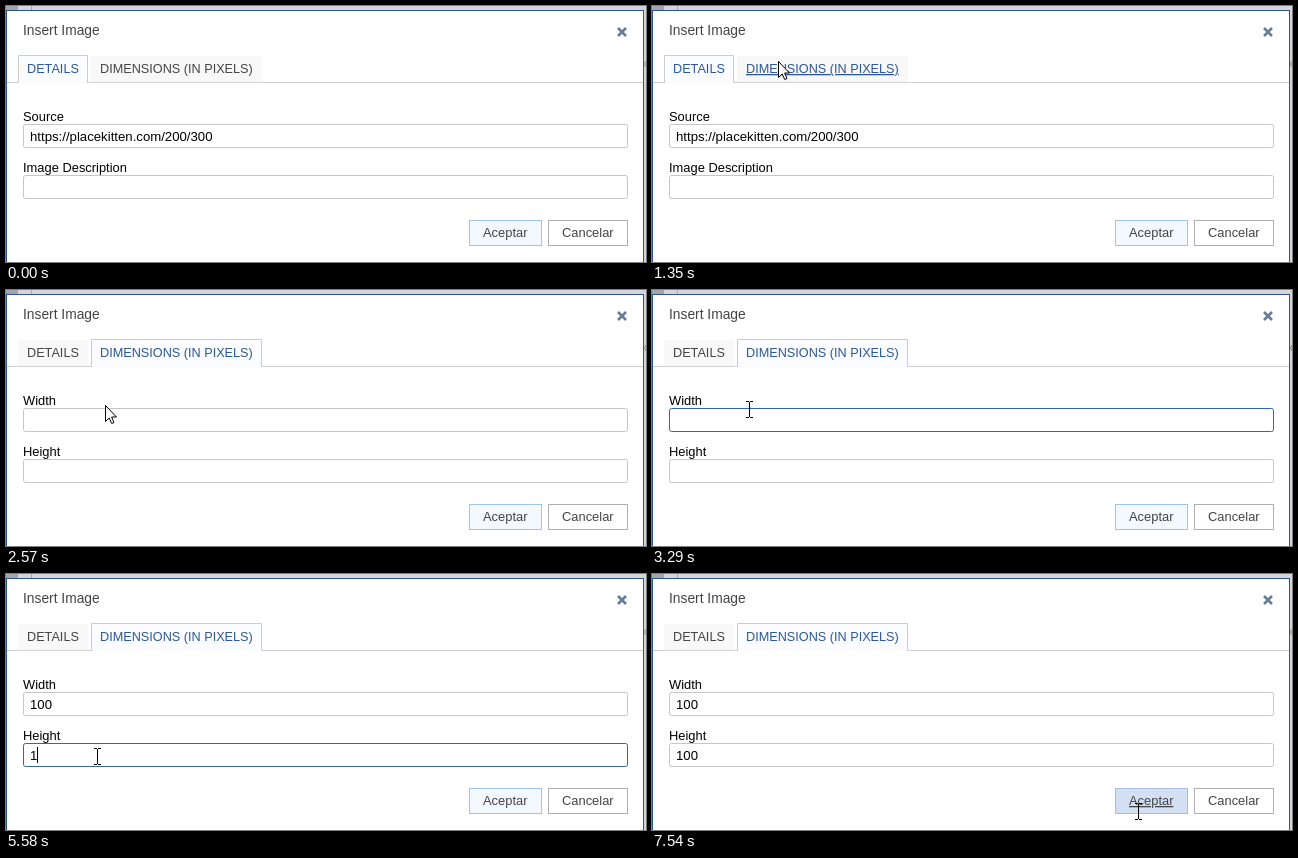
Write an HTML page that moves like this. It is 640 by 256 pixels and loops after 7610 ms.

```html
<!DOCTYPE html>
<html lang="en">
<head>
<meta charset="utf-8">
<title>Insert Image dialog</title>
<style>
  html, body { margin: 0; width: 100%; height: 100%; overflow: hidden; background: #fff; }
  svg { display: block; width: 100%; height: 100%; }
  text { font: 12.9px "Liberation Sans", Arial, sans-serif; white-space: pre; }
  .title { font-size: 13.8px; fill: #444; }
  .tab text { font-size: 12.68px; fill: #444; }
  .tab rect { fill: #f8f8f8; }
  .tab path { fill: #fbfcff; stroke: #ccc; visibility: hidden; }
  .tab.selected path { visibility: visible; }
  .tab.selected text, .tab.hover text { fill: #2b579a; }
  .hover text { text-decoration: underline; }
  .field { fill: #fff; }
  .value { font-size: 13.2px; }
  .button text { fill: #444; }
  #accept rect { fill: #f4f8ff; stroke: #9fc3ee; }
  #accept.hover rect { fill: #d3e0f3; stroke: #a3bde3; }
  #tooltip text { font: 11.5px "Open Sans", sans-serif; fill: #575757; }
</style>
</head>
<body>
<svg viewBox="0 0 640 256">
  <!-- page behind the dialog -->
  <rect width="640" height="256" fill="#d4d5da"/>
  <rect width="12" height="4" fill="#a3a5ac"/>
  <rect x="25" width="1" height="4" fill="#aaa"/>
  <path d="M640 55L638.5 58L640 61" fill="none" stroke="#888"/>

  <rect x=".5" y="4.5" width="637" height="260" fill="#fff" stroke="#2b579a"/>
  <text class="title" x="17" y="29">Insert Image</text>
  <path d="M612 22L620 30M620 22L612 30" stroke="#667a9b" stroke-width="2.5"/>

  <path d="M1 76.5H637" stroke="#d0d0d0"/>
  <g class="tab" id="details">
    <rect x="12" y="50" width="70" height="26"/>
    <path d="M12.5 77V49.5H81.5V77"/>
    <text x="21" y="67">DETAILS</text>
  </g>
  <g class="tab" id="dimensions">
    <rect x="85" y="50" width="171" height="26"/>
    <path d="M85.5 77V49.5H255.5V77"/>
    <text x="94" y="67">DIMENSIONS (IN PIXELS)</text>
  </g>

  <text id="label0" x="17" y="115"/>
  <rect class="field" id="field0" x="17.5" y="118.5" width="604" height="23" rx="2"/>
  <text class="value" id="value0" x="24" y="135"/>
  <text id="label1" x="17" y="166"/>
  <rect class="field" id="field1" x="17.5" y="169.5" width="604" height="23" rx="2"/>
  <text class="value" id="value1" x="24" y="186"/>
  <rect id="caret" width="1" height="16"/>

  <g class="button" id="accept">
    <rect x="463.5" y="214.5" width="72" height="25"/>
    <text x="477" y="231">Aceptar</text>
  </g>
  <g class="button">
    <rect x="542.5" y="214.5" width="79" height="25" fill="#fff" stroke="#b0b0b0"/>
    <text x="556" y="231">Cancelar</text>
  </g>

  <g id="tooltip">
    <rect x="139" y="74" width="128" height="18" fill="#000" opacity=".2"/>
    <rect x="136.5" y="71.5" width="127" height="18" fill="#fff" stroke="#777"/>
    <text x="141" y="85">Dimensions (in pixels)</text>
  </g>

  <path id="arrow" d="M.5 .5V16.5L4.2 13L6.7 18.5L9 17.5L6.6 12H11.5Z" fill="#fff" stroke="#000"/>
  <path id="beam" d="M-3 -7.5H0M1 -7.5H4M.5 -7V8M-3 8.5H0M1 8.5H4" fill="none" stroke="#000"/>
</svg>
<script>
const LOOP = 7610, STEP = 70, FADE = 150, BLINK = 530;
const $ = id => document.getElementById(id);

// The pointer glides from one resting place to the next, optionally bent towards "via".
const offstage = [499, 291];
const moves = [
  { start: 500, duration: 700, to: [126, 55] },
  { start: 2210, duration: 560, to: [97, 119] },
  { start: 4500, duration: 280, to: [102, 193] },
  { start: 4780, duration: 350, to: [91, 182] },
  { start: 6650, duration: 770, via: [300, 275], to: [472, 223] },
  { start: 7470, duration: 140, to: [486, 237] }
];

// Focus spans and the times at which "1", "0", "0" are typed.
const fields = [
  { top: 118, focus: 2760, blur: 5050, keys: [3620, 3890, 4040], labels: ["Source", "Width"] },
  { top: 169, focus: 5050, blur: 7250, keys: [5580, 6060, 6190], labels: ["Image Description", "Height"] }
];

const show = (id, on) => $(id).setAttribute("visibility", on ? "visible" : "hidden");
const ramp = (t, start) => Math.min(1, Math.max(0, (t - start) / FADE));
const mix = (a, b, k) => `rgb(${a.map((v, i) => Math.round(v + (b[i] - v) * k))})`;
const easeOut = p => 1 - (1 - p) ** 2;

function pointerAt(t) {
  let from = offstage;
  for (const { start, duration, via, to } of moves) {
    if (t < start) break;
    const elapsed = (Math.floor((t - start) / STEP) + 1) * STEP;
    const e = easeOut(Math.min(1, elapsed / duration));
    from = from.map((a, i) => {
      const control = via ? via[i] : (a + to[i]) / 2;
      return Math.round(a * (1 - e) ** 2 + 2 * control * e * (1 - e) + to[i] * e * e);
    });
    if (e === 1) from = to;
  }
  return from;
}

function render(t) {
  const [x, y] = pointerAt(t);
  const inside = (left, top, right, bottom) => x >= left && x < right && y >= top && y < bottom;
  const second = t >= 1940;
  let beam = inside(477, 236, 523, 240), caretOn = false;

  $("details").classList.toggle("selected", !second);
  $("dimensions").classList.toggle("selected", second);
  $("dimensions").classList.toggle("hover", inside(85, 49, 256, 77));
  $("accept").classList.toggle("hover", inside(463, 214, 536, 240));
  show("tooltip", t >= 1680 && t < 1880);

  fields.forEach(({ top, focus, blur, keys, labels }, i) => {
    const typed = keys.filter(k => t >= k).length;
    const hover = second && inside(17, top, 622, top + 24);
    const base = hover ? [163, 186, 218] : [198, 198, 202];
    const glow = ramp(t, focus) - ramp(t, blur);
    $("field" + i).setAttribute("stroke", mix(base, [54, 101, 168], glow));
    $("label" + i).textContent = labels[+second];
    $("value" + i).textContent =
      second ? "100".slice(0, typed) : i ? "" : "https://placekitten.com/200/300";

    const lastInput = typed ? keys[typed - 1] : focus;
    if (t >= focus && t < blur && t - lastInput < BLINK) {
      caretOn = true;
      $("caret").setAttribute("x", 24 + 7 * typed);
      $("caret").setAttribute("y", top + 4);
    }
    beam = beam || hover;
  });

  show("caret", caretOn);
  show("arrow", !beam);
  show("beam", beam);
  for (const id of ["arrow", "beam"]) $(id).setAttribute("transform", `translate(${x} ${y})`);
}

const startTime = performance.now();
function frame() {
  render((performance.now() - startTime) % LOOP);
  requestAnimationFrame(frame);
}
frame();
</script>
</body>
</html>
```
